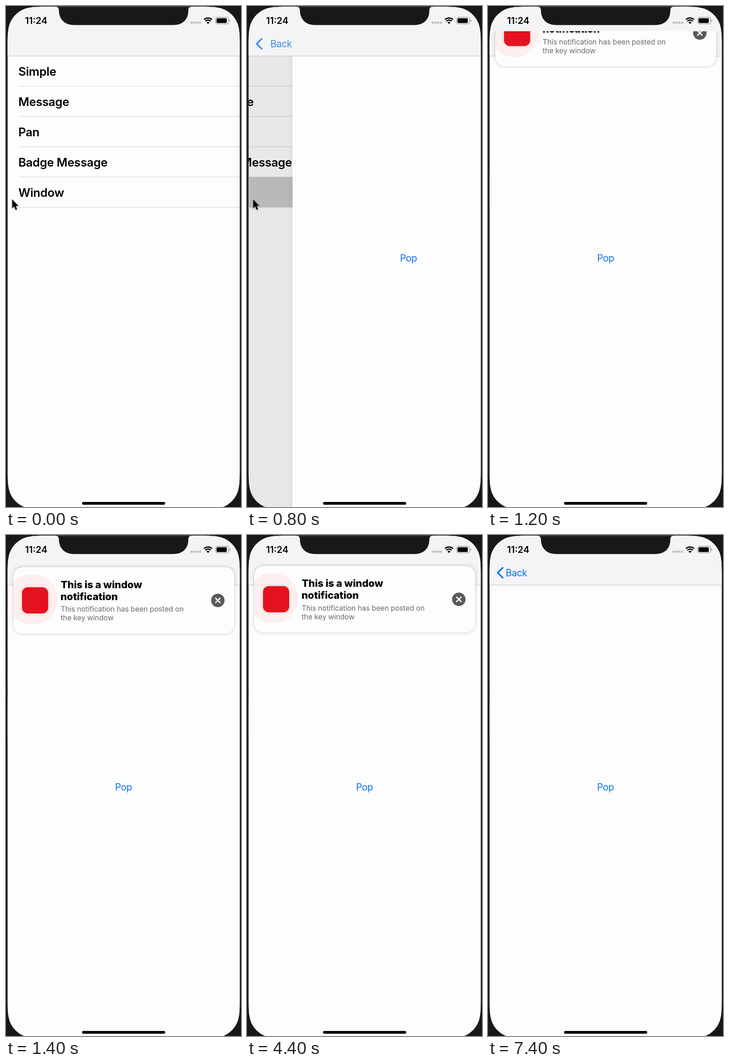
Animation, 513 px wide and 1092 px high, one loop 7500 ms. Source, as an HTML page:

```html
<!DOCTYPE html>
<html lang="en">
<head>
<meta charset="utf-8">
<title>Window notification</title>
<style>
  html, body { margin: 0; width: 100%; height: 100%; overflow: hidden; background: #18171a; }
  svg { display: block; width: 100vw; height: 100vh; }
  text { font-family: Inter, "Liberation Sans", sans-serif; font-optical-sizing: none; white-space: pre; }
  .time { font-size: 20px; font-weight: 600; }
  .row { font-size: 25.7px; font-weight: 600; letter-spacing: -.012em; }
  .link { font-size: 20.8px; fill: #0b74ee; letter-spacing: -.022em; }
  .title { font-size: 22px; font-weight: 800; letter-spacing: -.005em; }
  .body { font-size: 15.9px; fill: #6c6b70; letter-spacing: -.008em; }
  .line { stroke: #cfced2; stroke-width: 1.1; }
  .shell { filter: drop-shadow(0 0 3.5px rgba(0, 0, 0, .22)); }
  .icon { filter: drop-shadow(0 0 3px rgba(0, 0, 0, .2)); }
  #cursor { filter: drop-shadow(0 1.5px 1.5px rgba(0, 0, 0, .35)); }
</style>
</head>
<body>
<svg viewBox="0 0 513 1092" preserveAspectRatio="none">
  <defs>
    <clipPath id="screen"><path id="outline"/></clipPath>
    <clipPath id="below"><rect y="55" width="513" height="1037"/></clipPath>
    <clipPath id="cardShape"><rect x="16" y="67.5" width="482" height="145" rx="20"/></clipPath>
    <linearGradient id="edge">
      <stop offset="0" stop-color="#000" stop-opacity="0"/>
      <stop offset="1" stop-color="#000" stop-opacity=".035"/>
    </linearGradient>
  </defs>

  <g clip-path="url(#screen)">
    <rect width="513" height="1092" fill="#fefdfe"/>

    <g id="list">
      <rect id="picked" x="3.5" y="373" width="507" height="66" fill="#cac8cc"/>
      <g id="rows"></g>
    </g>
    <rect id="dim" y="109" width="513" height="983"/>

    <g id="page">
      <rect x="-8.5" y="109" width="12" height="983" fill="url(#edge)"/>
      <rect x="3.5" y="109" width="507" height="983" fill="#fefdfe"/>
      <text class="link" x="256.5" y="557.3" text-anchor="middle">Pop</text>
    </g>

    <rect width="513" height="109" fill="#f4f3f5"/>
    <path d="M0 109.2H513" stroke="#bfbec1"/>
    <g id="nav">
      <path d="M33 70.5L21.2 82.3L33 94.1" fill="none" stroke="#0b74ee" stroke-width="3.4"/>
      <text id="back" class="link" x="38.5" y="89.8">Back</text>
    </g>

    <g clip-path="url(#below)">
      <g id="card">
        <rect class="shell" x="16" y="67.5" width="482" height="145" rx="20" fill="#fefdfe"/>
        <g clip-path="url(#cardShape)">
          <circle cx="57" cy="138" r="55" fill="#fdefee"/>
        </g>
        <rect class="icon" x="35" y="111.5" width="57" height="57" rx="12.5" fill="#e4121f"/>
        <text class="title" x="119.5" y="113.3">This is a window</text>
        <text class="title" x="119" y="139.3">notification</text>
        <text class="body" x="119.3" y="165">This notification has been posted on</text>
        <text class="body" x="119.3" y="184">the key window</text>
        <circle cx="462.4" cy="140.2" r="14.7" fill="#5b5b5d"/>
        <path d="M457.6 135.4l9.6 9.6m0-9.6l-9.6 9.6" stroke="#fff" stroke-width="2.7" stroke-linecap="round"/>
      </g>
    </g>

    <text class="time" x="41.5" y="39">11:24</text>
    <g fill="#c1c0c3">
      <rect x="403" y="34" width="4.8" height="4.8" rx="1.3"/>
      <rect x="409" y="34" width="4.8" height="4.8" rx="1.3"/>
      <rect x="415" y="34" width="4.8" height="4.8" rx="1.3"/>
      <rect x="421" y="34" width="4.8" height="4.8" rx="1.3"/>
    </g>
    <path d="M441 39.2L437.7 35.7A4.8 4.8 0 0 1 444.3 35.7Z"/>
    <path d="M435.1 33.1A8.4 8.4 0 0 1 446.9 33.1M432.2 29.8A12.6 12.6 0 0 1 449.8 29.8" fill="none" stroke="#000" stroke-width="2.8"/>
    <rect x="457.6" y="24.7" width="28.6" height="14.2" rx="4" fill="none" stroke="#8f8e91" stroke-width="1.2"/>
    <rect x="459.6" y="26.7" width="22.4" height="10.2" rx="2.2"/>
    <path d="M487.8 29.3q1.8 .7 1.8 2.5t-1.8 2.5z" fill="#8f8e91"/>

    <path d="M106 0V1.5C113 1.5 115.5 4 115.5 10C116 30 129 41.5 149 41.5H365C385 41.5 398 30 398 10C398 4 400.5 1.5 408 1.5V0Z" fill="#18171a"/>
    <rect x="166" y="1081" width="181.5" height="6" rx="3"/>
  </g>

  <path id="cursor" d="M13.5 421.3v19.8l4.4-4.1 3.1 7.3 3.3-1.4-3-7.1h5.9z" stroke="#fff" stroke-width="1.3" paint-order="stroke"/>
</svg>

<script>
const LOOP = 7500, STEP = 100, WIDTH = 507, TRAVEL = 157.5;
const PUSH_AT = 632, SHOW_AT = 1123, HIDE_AT = 6531, HIDE_MS = 200;
const $ = id => document.getElementById(id);

// Rounded box whose corners ease into the sides, unlike plain arcs.
function smoothBox(left, top, right, bottom, r) {
  const half = [[0, 1.529], [0, 1.088], [0, .868], [.075, .631], [.169, .373]];
  const corner = [...half, ...half.map(([x, y]) => [y, x]).reverse()];
  const path = (pts, x, y, sx, sy) => {
    const p = pts.map(([u, v]) => `${x + sx * u * r} ${y + sy * v * r}`);
    return `${p[0]}C${p.slice(1).join(' ')}`;
  };
  const back = [...corner].reverse();
  return 'M' + [
    path(corner, left, top, 1, 1),
    path(back, right, top, -1, 1),
    path(corner, right, bottom, -1, -1),
    path(back, left, bottom, 1, -1)
  ].join('L') + 'Z';
}

$('outline').setAttribute('d', smoothBox(3.5, 1.5, 510.3, 1097, 60));

$('rows').innerHTML = ['Simple', 'Message', 'Pan', 'Badge Message', 'Window'].map((name, i) => `
  <text class="row" x="27" y="${152 + 66 * i}">${name}</text>
  <path class="line" d="M28 ${174.8 + 66 * i}H510.5"/>`).join('');

// Both springs return the share of the way still to go.
function pushLeft(ms) {
  const p = 18.26 * Math.max(0, ms) / 1000;
  return (1 + p) * Math.exp(-p);
}

function dropLeft(ms) {
  const p = 19 * Math.max(0, ms) / 1000;
  return Math.exp(-.8 * p) * (Math.cos(.6 * p) + Math.sin(.6 * p) * .8 / .6);
}

const move = (id, x, y = 0) => $(id).setAttribute('transform', `translate(${x.toFixed(2)} ${y.toFixed(2)})`);
const fade = (id, a) => $(id).setAttribute('opacity', a.toFixed(3));

function draw(t) {
  const left = pushLeft(t - PUSH_AT);
  const done = 1 - left;
  move('page', left * WIDTH);
  move('list', -.3 * WIDTH * done);
  fade('dim', .1 * done);
  fade('picked', t > PUSH_AT ? 1 : 0);
  fade('nav', done);
  move('back', left * 66.7);

  const out = Math.min(1, Math.max(0, (t - HIDE_AT) / HIDE_MS));
  const lift = t < HIDE_AT ? dropLeft(t - SHOW_AT) : out ** 1.7;
  move('card', 0, -TRAVEL * lift);
  fade('card', lift < 1 ? 1 : 0);

  fade('cursor', t < 900 ? 1 : 0);
}

function tick() {
  const t = performance.now() % LOOP;
  draw(Math.floor(t / STEP) * STEP);
  requestAnimationFrame(tick);
}
tick();
</script>
</body>
</html>
```
